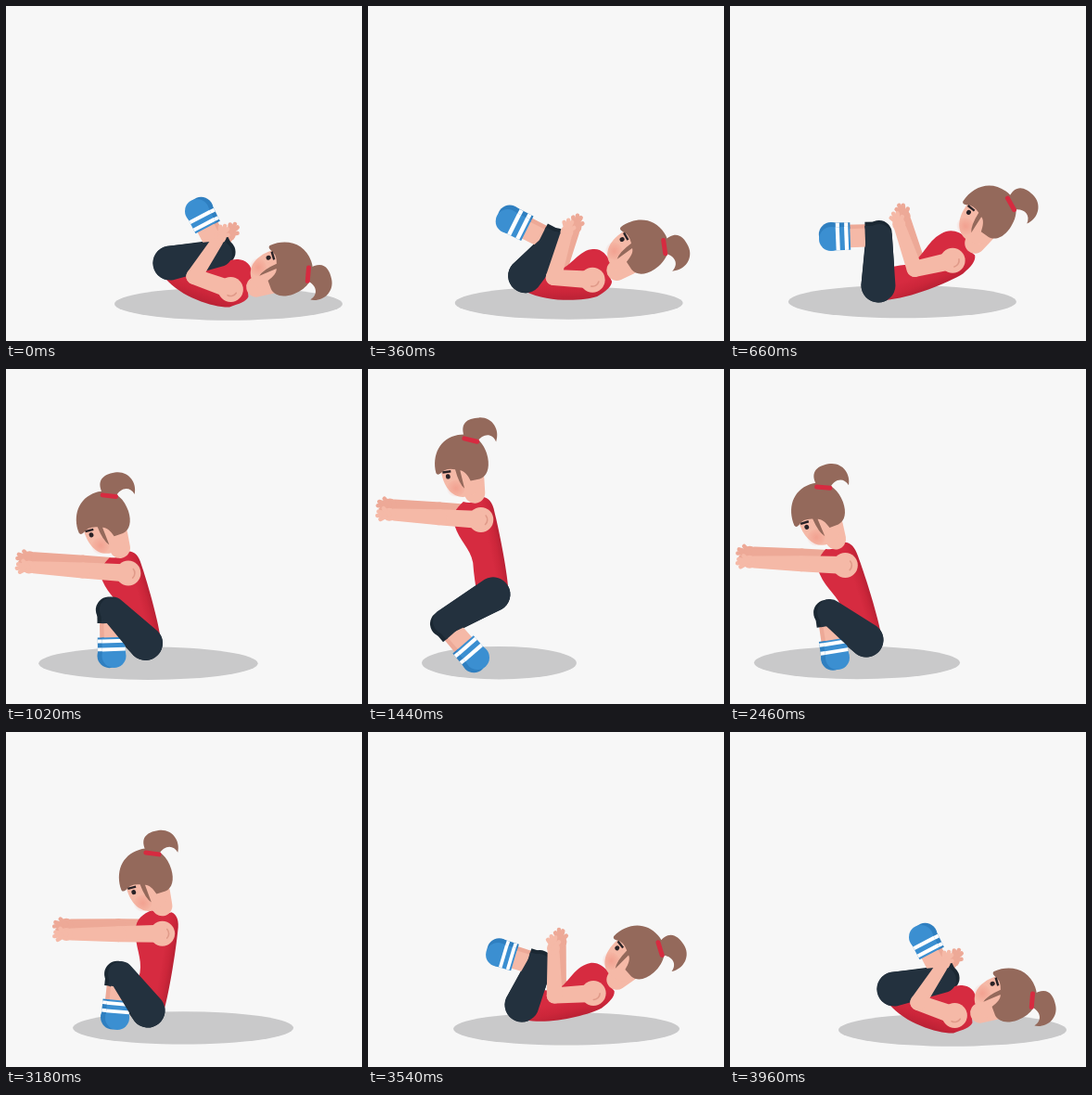
Recreate the animation shown at these times as an HTML page with a canvas. Size 384x361 px, loop 3.99 s.

```html
<!DOCTYPE html>
<html lang="en">
<head>
<meta charset="utf-8">
<title>Roll-up squat</title>
<style>
html, body { margin: 0; width: 100%; height: 100%; overflow: hidden; background: #f7f7f7; }
canvas { display: block; }
</style>
</head>
<body>
<canvas id="stage" width="384" height="361"></canvas>
<script>
const ctx = document.getElementById('stage').getContext('2d');
const LOOP = 3990;
const SHIRT = '#d62b40', HAIR = '#94695b', INK = '#2a2327';
const NEAR = { skin: '#f5b9a7', pants: '#23313e', sock: '#3b8fd1' };
const FAR = { skin: '#eda997', pants: '#1b2833', sock: '#2f7fc0' };

// shadow x, shadow radius, head x, y, tilt, then hip, knee, foot and wrist points
const lie   = [240, 123, 296.5, 284.5, 70, 177, 277, 230, 267, 206, 221, 228, 253];
const tuck  = [186, 123, 276, 226, 36, 160, 301, 161, 249, 109, 251, 184, 240];
const sit   = [151, 117, 99, 158, -20, 149, 294, 110, 261, 117, 311, 24, 209];
const rise  = [141.5, 83.5, 101.5, 105, -11, 135, 243, 84, 272, 118, 311, 28, 157];
const stand = [126, 75, 110, 54, 0, 122, 197, 103, 253, 118, 311, 111, 200];
const dip   = [126, 75, 110, 63, 0, 123, 206, 98, 258, 118, 311, 108, 207];
const sink  = [...rise.slice(0, -2), 56, 192];
const squat = [137, 111, 96, 157, -20, 147, 292, 108, 262, 116, 311, 26, 208];
const lean  = [191, 119, 151.5, 160, -17, 153, 300, 124, 261, 120, 308, 70, 218];
const back  = [214, 122, 286, 240, 48, 166, 294, 184, 253, 140, 240, 200, 238];

const keys = [
  [0, lie], [660, tuck], [1070, sit], [1440, rise], [1700, stand], [2040, dip],
  [2160, sink], [2460, squat], [2700, sit], [3180, lean], [3540, back],
  [3930, lie], [LOOP, lie]
];

const slope = (i, j) => (keys[i + 1][1][j] - keys[i][1][j]) / (keys[i + 1][0] - keys[i][0]);

function tangent(i, j) {
  if (!i || i === keys.length - 1) return 0;
  const a = slope(i - 1, j), b = slope(i, j);
  return a * b <= 0 ? 0 : 2 * a * b / (a + b);
}

// Monotone cubic through the key poses
function poseAt(t) {
  let i = 0;
  while (t >= keys[i + 1][0]) i++;
  const [t0, from] = keys[i], [t1, to] = keys[i + 1];
  const d = t1 - t0, s = (t - t0) / d, e = s * s * (3 - 2 * s);
  return from.map((v, j) => v + (to[j] - v) * e +
    d * s * (1 - s) * ((1 - s) * tangent(i, j) - s * tangent(i + 1, j)));
}

const mix = (a, b, k) => [a[0] + (b[0] - a[0]) * k, a[1] + (b[1] - a[1]) * k];
const add = (a, v, k = 1) => [a[0] + v[0] * k, a[1] + v[1] * k];
const dist = (a, b) => Math.hypot(b[0] - a[0], b[1] - a[1]);
const angle = (a, b) => Math.atan2(b[1] - a[1], b[0] - a[0]);
const unit = (a, b) => {
  const d = dist(a, b) || 1;
  return [(b[0] - a[0]) / d, (b[1] - a[1]) / d];
};
const turn = (v, r) => [
  v[0] * Math.cos(r) - v[1] * Math.sin(r),
  v[0] * Math.sin(r) + v[1] * Math.cos(r)
];

function fill(path, color) {
  ctx.fillStyle = color;
  ctx.fill(new Path2D(path));
}

function ellipse(x, y, rx, ry, color) {
  ctx.fillStyle = color;
  ctx.beginPath();
  ctx.ellipse(x, y, rx, ry, 0, 0, 7);
  ctx.fill();
}

function line(a, b, width, color, cap = 'round') {
  ctx.strokeStyle = color;
  ctx.lineWidth = width;
  ctx.lineCap = cap;
  ctx.beginPath();
  ctx.moveTo(...a);
  ctx.lineTo(...b);
  ctx.stroke();
}

// Tapered limb with round ends
function limb(a, ra, b, rb, color) {
  const r = angle(a, b), q = Math.PI / 2;
  ctx.fillStyle = color;
  ctx.beginPath();
  ctx.arc(...a, ra, r + q, r - q);
  ctx.arc(...b, rb, r - q, r + q);
  ctx.fill();
}

function leg(hip, knee, foot, c) {
  const along = k => mix(knee, foot, k);
  line(knee, foot, 20, c.skin);
  line(along(.6), foot, 25, c.sock, 'butt');
  ellipse(...foot, 13, 13, c.sock);
  for (const k of [.68, .86]) line(along(k - .04), along(k + .04), 25, '#fff', 'butt');
  line(knee, along(.29), 25, c.pants, 'butt');
  limb(hip, 18.5, knee, 14, c.pants);
}

function arm(shoulder, wrist, c) {
  const upper = 42, fore = 46;
  const d = dist(shoulder, wrist), u = unit(shoulder, wrist);
  let elbow = mix(shoulder, wrist, .48);
  if (d < upper + fore) {
    const k = (upper * upper - fore * fore + d * d) / (2 * d);
    const h = Math.sqrt(Math.max(0, upper * upper - k * k));
    elbow = add(add(shoulder, u, k), [u[1], -u[0]], h);
  }
  ellipse(...shoulder, 13.5, 13.5, c.skin);
  limb(shoulder, 9.5, elbow, 8.5, c.skin);
  limb(elbow, 8.5, wrist, 6.5, c.skin);
  const dir = unit(elbow, wrist), palm = add(wrist, dir, 5);
  ellipse(...palm, 7, 7, c.skin);
  for (const [r, len] of [[-.55, 11], [-.15, 13], [.2, 12], [.75, 9]])
    line(palm, add(palm, turn(dir, r), len), 4.5, c.skin);
}

function torso(neck, hip, bend) {
  const len = dist(neck, hip), u = unit(neck, hip);
  ctx.save();
  ctx.translate(...neck);
  ctx.rotate(Math.atan2(-u[0], u[1]));
  ctx.scale(1, len / 95);
  const shade = ctx.createLinearGradient(6, 0, 20 + bend, 0);
  shade.addColorStop(0, SHIRT);
  shade.addColorStop(.5, '#cc263a');
  shade.addColorStop(1, '#b52033');
  fill(`M-13,-2 C-22,3 -29,9 -27,20 C-25,36 ${bend - 15},45 ${bend - 15},60
    Q${bend / 2 - 17},76 -17,95 L17,95 C${20 + bend},70 ${19 + bend},30 ${18 + bend * .6},14
    C18,4 14,-2 8,-3 Q-2,3 -13,-2Z`, shade);
  ctx.restore();
}

function head(x, y, tilt) {
  ctx.save();
  ctx.translate(x, y);
  ctx.rotate(tilt);
  line([10, 16], [8, 31], 22, NEAR.skin);
  fill('M9,-28 C5,-46 15,-50 28,-48 C42,-46 48,-31 41,-19 C39,-29 29,-31 21,-23Z', HAIR);
  fill('M-23,-2 C-25,20 -15,33 -2,33 C10,33 20,26 21,10 L21,-2Z', NEAR.skin);
  const blush = ctx.createRadialGradient(-11, 22, 1, -11, 22, 11);
  blush.addColorStop(0, 'rgba(238,130,115,.4)');
  blush.addColorStop(1, 'rgba(238,130,115,0)');
  ellipse(-11, 22, 10, 9, blush);
  fill(`M-29,2 C-30,-18 -18,-34 2,-34 C20,-34 29,-20 29,-4 C29,8 24,16 16,17 L6,17
    C4,10 1,5 -3,4 L-2,24 Q-7,18 -8,2 Q-18,-2 -24,3 Q-28,5 -29,2Z`, HAIR);
  line([8, -29], [21, -23], 5, SHIRT);
  line([-22, 2.5], [-13, 3], 2.4, INK, 'butt');
  ellipse(-17, 8, 2.4, 2.6, INK);
  ctx.restore();
}

function draw(t) {
  const [sx, sr, hx, hy, deg, ...p] = poseAt(t);
  const [hip, knee, foot, wrist] = [0, 2, 4, 6].map(i => [p[i], p[i + 1]]);
  const tilt = deg * Math.PI / 180, bend = Math.max(0, deg) / 6;
  const neck = add([hx, hy], turn([7, 40], tilt));
  const u = unit(neck, hip);
  const shoulder = add(mix(neck, hip, .2), [u[1], -u[0]], 2 + bend * .4);
  const reach = unit(shoulder, wrist), shin = unit(knee, foot);
  const armSide = [-reach[1], reach[0]], legSide = [-shin[1], shin[0]];

  ctx.fillStyle = '#f7f7f7';
  ctx.fillRect(0, 0, 384, 361);
  ellipse(sx, 316 + (sx - 126) * .044, sr, 17.7, '#c9c9ca');
  arm(add(shoulder, armSide, 6), add(wrist, armSide, 10), FAR);
  leg(hip, add(knee, legSide, 4), add(foot, legSide, 5), FAR);
  torso(neck, hip, bend);
  leg(hip, knee, foot, NEAR);
  head(hx, hy, tilt);
  arm(shoulder, wrist, NEAR);
  // crease at the shoulder
  const r = Math.atan2(reach[1], reach[0]);
  ctx.strokeStyle = '#e09a89';
  ctx.lineWidth = 1.6;
  ctx.beginPath();
  ctx.arc(...shoulder, 7, r + 2.4, r + 3.9);
  ctx.stroke();
}

const start = performance.now();
function tick() {
  draw((performance.now() - start) % LOOP);
  requestAnimationFrame(tick);
}
tick();
</script>
</body>
</html>
```
